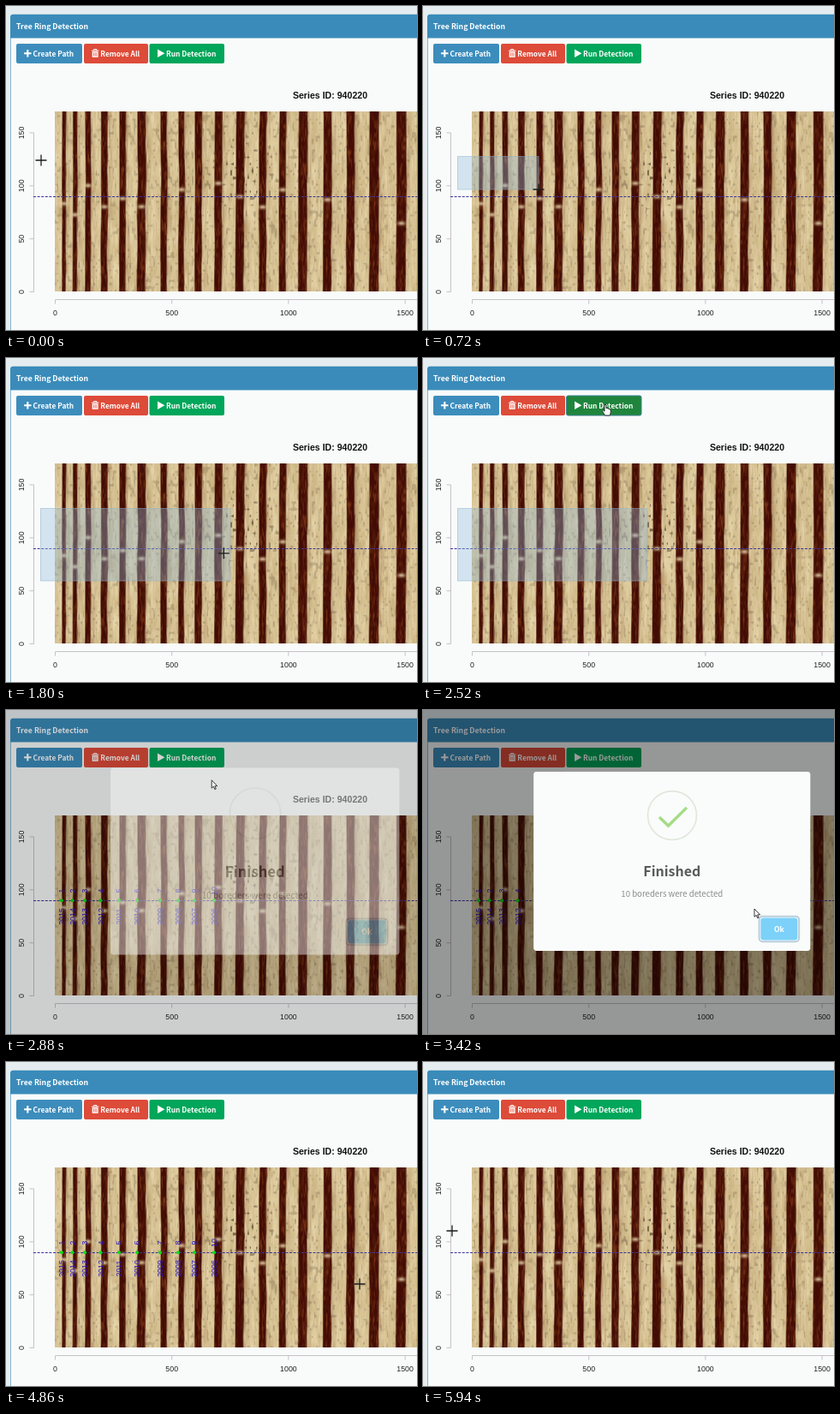
These frames come from a looping animation (480 px wide and 378 px high, 6.12 s). An HTML page with a canvas:

```html
<!DOCTYPE html>
<html lang="en">
<head>
<meta charset="utf-8">
<title>Tree Ring Detection</title>
<style>
  html, body { margin: 0; width: 100%; height: 100%; overflow: hidden; background: #f9fbfb; }
  #wood { position: absolute; left: 57px; top: 123px; }
  svg { position: absolute; left: 0; top: 0; }
  .ui { font-family: "Noto Sans CJK JP", "Noto Sans CJK SC", "Open Sans", sans-serif; }
  .bold { font-weight: 700; }
  .btn { font-size: 8.4px; fill: #fff; }
  .plot { font-family: "Liberation Sans", Arial, sans-serif; font-size: 8.8px; fill: #222; }
  .mid { text-anchor: middle; }
  .axis { stroke: #c6c0c6; fill: none; }
  .mark { fill: #2614c4; }
  .hand, .arrow { fill: #fff; stroke: #222; stroke-width: .9; stroke-linejoin: round; }
  #run { fill: #00a65a; }
  #run.hot { fill: #1f853c; stroke: #3d7f92; }
  #remove { fill: #dd4b39; }
  #remove.hot { fill: #c9402f; }
  #ok { fill: #7cd1f9; }
  #ok.hot { fill: #74cbf3; }
</style>
</head>
<body>
<canvas id="wood" width="423" height="210"></canvas>
<svg width="480" height="378" viewBox="0 0 480 378">
  <path d="M0 0H480V10H5V378H0Z" fill="#e6edf1"/>
  <path d="M5.5 378V14" stroke="#84b6d5"/>
  <path d="M5 37.6V12.8q0-3 3-3H480V37.6Z" fill="#3a8bba"/>
  <text class="ui bold" x="12" y="27.3" font-size="8.75" fill="#fff">Tree Ring Detection</text>

  <rect x="12" y="44" width="77" height="23" rx="2" fill="#3c8dbc"/>
  <path d="M25.3 51v8.4M21.1 55.2h8.4" stroke="#fff" stroke-width="2.1"/>
  <text class="ui bold btn" x="31.5" y="58.6">Create Path</text>

  <rect id="remove" x="91" y="44" width="75" height="23" rx="2"/>
  <path d="M100 52.1h8.4M102.6 52v-1.4h3.2V52" stroke="#fff" fill="none"/>
  <path d="M100.7 53.2h7v6.6h-7z" fill="#fff"/>
  <path d="M102.5 54.4v4.2M104.2 54.4v4.2M105.9 54.4v4.2" stroke="#dd4b39" stroke-width=".7"/>
  <text class="ui bold btn" x="110.3" y="58.6">Remove All</text>

  <rect id="run" x="167.5" y="44" width="87.5" height="23" rx="2"/>
  <path d="M177 50.6l8.4 4.7-8.4 4.7z" fill="#fff"/>
  <text class="ui bold btn" x="187" y="58.6">Run Detection</text>

  <text class="plot mid" x="378.5" y="108.3" style="font-size:10.6px;font-weight:700;fill:#111">Series ID: 940220</text>
  <g id="axes"></g>
  <path d="M32 222.5H480" stroke="#3a3398" stroke-dasharray="3 1.6"/>
  <g id="marks"></g>
  <rect id="brush" x="40.5" y="175.5" fill="#8fb8d8" fill-opacity=".37" stroke="#8fb0c8" stroke-opacity=".5"/>

  <rect id="shade" width="480" height="378"/>
  <g id="modal">
    <rect x="129" y="72" width="323.5" height="209" rx="3.4" fill="#fafcfb"/>
    <circle cx="291" cy="123" r="28.5" fill="none" stroke="#c9d8c4" stroke-opacity=".55" stroke-width="1.6"/>
    <path id="check" d="M276 125l10.5 10L309 112.8" pathLength="1" fill="none" stroke="#a5dc86" stroke-width="3.4"/>
    <text class="ui bold mid" x="290.8" y="194" font-size="16" fill="#595b5b">Finished</text>
    <text class="ui mid" x="290.8" y="218.3" font-size="9.65" fill="#8a8c8c">10 boreders were detected</text>
    <rect x="392.7" y="240.7" width="46.6" height="29.6" rx="4" fill="none" stroke="#bccfdc" stroke-width="2"/>
    <rect id="ok" x="394.5" y="242.5" width="43" height="26" rx="3"/>
    <text class="ui bold mid" x="416" y="258.8" font-size="8.7" fill="#fff">Ok</text>
  </g>

  <g id="cursor">
    <path id="cross" d="M-6.5 0H6.5M0-6.5V6.5" stroke="#1c1c1c" stroke-width="1.3"/>
    <path id="arrow" class="arrow" d="M0 0V9.3L2.2 7.4 3.7 10.8 5.1 10.2 3.7 6.9H6.6Z"/>
    <path id="hand" class="hand" d="M-1 .9Q0-.6 1 .9V4.7Q2.4 4 3 5.2 4.3 4.6 4.8 5.8 6.2 5.6 6.2 7V9.3Q6 11 5.2 13H-.6Q-1.6 10.6-3.2 8.8-4 7.4-2.6 7L-1 8.2Z"/>
  </g>
</svg>
<script>
const LOOP = 6120, STEP = 180;
const OPEN = 2760, CLOSE = 4590, CLEAR = 5490, FADE = 270;
const $ = id => document.getElementById(id);
const clamp = v => Math.max(0, Math.min(1, v));
const mix = (a, b, k) => a + (b - a) * k;
const smooth = k => k * k * (3 - 2 * k);
const blend = (a, b, k) => a.map((v, i) => mix(v, b[i], k));

// Left edge of each ring; the dark part takes a fixed share of the gap to the next
const rings = [65, 77.5, 92, 110.5, 132, 153, 180, 201, 220, 243, 268, 295, 318.5, 341, 370, 397, 424, 455.5];
const bands = rings.map((x, i) => ({ x, w: .36 * ((rings[i + 1] || x + 32) - x) }));
const knots = bands.map(({ x, w }, i) => [x + w / 2, 205 + 50 * hash(i, 9)])
  .filter((_, i) => hash(i, 4) < .6);

function hash(x, y) {
  let h = Math.imul(x, 374761393) + Math.imul(y, 668265263);
  h = Math.imul(h ^ (h >>> 13), 1274126177);
  return ((h ^ (h >>> 16)) >>> 0) / 4294967296;
}
function noise(x, y) {
  const i = Math.floor(x), j = Math.floor(y), u = smooth(x - i), v = smooth(y - j);
  return mix(mix(hash(i, j), hash(i + 1, j), u), mix(hash(i, j + 1), hash(i + 1, j + 1), u), v);
}
const blob = (dx, dy, w, h) => Math.exp(-((dx / w) ** 2) - (dy / h) ** 2);

// Sharp left edge, softer right edge, faint tail
function darkness(x, grain) {
  return Math.max(...bands.map(({ x: l, w }) => {
    const d = x - l;
    const core = smooth(clamp((w + .8 + grain - d) / 2.6));
    const tail = .25 * grain * clamp(1 - (d - w) / 7);
    return clamp((d + .7) / 1.5) * Math.max(core, tail);
  }));
}
function paintWood() {
  const ctx = $("wood").getContext("2d"), img = ctx.createImageData(423, 210);
  for (let j = 0, p = 0; j < 210; j++) {
    for (let i = 0; i < 423; i++, p += 4) {
      const x = i + 57, y = j + 123;
      const streak = noise(x / 1.7, y / 16), fine = noise(x / 1.2 + 90, y / 5), cloud = noise(x / 9, y / 22 + 50);
      const fleck = clamp((noise(x / 2.5, y / 4 + 30) - .68) * 5) * (.25 + .6 * blob(x - 275, y - 195, 35, 40));
      const sway = (noise(y / 40, x / 30) - .5) * 1.2 - (y - 228) / 230;
      const knot = Math.max(...knots.map(([kx, ky]) => blob(x - kx, y - ky, 4.5, 2.5)));
      let c = blend([235, 219, 177], [196, 171, 120], .35 * streak + .3 * fine + .35 * cloud);
      c = blend(c, [100, 82, 56], fleck);
      c = blend(c, blend([66, 12, 4], [118, 50, 20], clamp(fine * streak * 1.5 - .2)), darkness(x - sway, streak));
      c = blend(c, [232, 212, 166], .8 * knot);
      img.data.set([...c, 255], p);
    }
  }
  ctx.putImageData(img, 0, 0);
}

const upright = (x, y, s, cls = "") =>
  `<text class="plot mid ${cls}" transform="translate(${x + 3} ${y}) rotate(-90)">${s}</text>`;

function buildPlot() {
  let axes = '<path class="axis" d="M32.5 148V333.5M57.5 342.5H480"/>';
  for (let i = 0; i < 4; i++) {
    const x = 57.5 + 136.2 * i, y = 333.5 - 61.85 * i;
    axes += `<path class="axis" d="M${x} 342.5v5M32.5 ${y}h-5"/>` +
      `<text class="plot mid" x="${x}" y="360.5">${500 * i}</text>` + upright(18, y, 50 * i);
  }
  $("axes").innerHTML = axes;
  $("marks").innerHTML = rings.slice(0, 10).map((x, i) =>
    upright(x, 241, 2015 - i, "mark") + upright(x, 211, i + 1, "mark") +
    `<circle cx="${x}" cy="222.3" r="2" fill="#0be010"/>`).join("");
}

// Pointer: rests at home, then moves of [leave, arrive, x, y]
const home = [41, 180], corner = [262, 260];
const moves = [
  [180, 1380, ...corner],
  [1620, 2340, 213, 54],
  [2700, 3420, 387, 232],
  [3420, 4140, 413, 259],
  [4860, 5400, 128, 55],
  [5580, 5940, 34, 197]
];
const pointer = t => moves.reduce((p, [from, to, ...end]) =>
  blend(p, end, smooth(clamp((t - from) / (to - from)))), home);

const show = (id, on) => $(id).style.display = on ? "" : "none";
const set = (id, attrs) => Object.entries(attrs).forEach(([k, v]) => $(id).setAttribute(k, v));

function draw(t) {
  const [x, y] = pointer(t);
  const alpha = clamp((t - OPEN) / FADE) * (1 - clamp((t - CLOSE) / FADE));
  const open = alpha > 0;

  const hover = (id, active) => {
    const b = $(id).getBBox();
    const hot = active && x >= b.x && x <= b.x + b.width && y >= b.y && y <= b.y + b.height;
    $(id).classList.toggle("hot", hot);
    return hot;
  };
  show("shade", open);
  show("modal", open);
  const hand = [hover("run", !open), hover("remove", !open), open && hover("ok", true)].includes(true);
  const cross = !hand && !open && y > 76;
  show("hand", hand);
  show("cross", cross);
  show("arrow", !hand && !cross);
  set("cursor", { transform: `translate(${x} ${y})` });

  const [bx, by] = t < 1440 ? [x, y] : corner;
  show("brush", t > 180 && t < OPEN);
  set("brush", { width: Math.max(0, bx - 40.5), height: Math.max(0, by - 175.5) });
  show("marks", t >= OPEN && t < CLEAR);

  const age = clamp((t - OPEN) / 300);
  const scale = 1 - .5 * Math.exp(-6 * age) * Math.cos(7 * age);
  set("shade", { opacity: .4 * alpha });
  set("modal", { opacity: alpha, transform: `translate(290.8 176.5) scale(${scale}) translate(-290.8 -176.5)` });
  const drawn = clamp((t - OPEN - 350) / 320);
  set("check", { "stroke-dasharray": `${drawn} 2` });
  show("check", drawn > 0);
}

paintWood();
buildPlot();
const start = performance.now();
function tick() {
  const t = (performance.now() - start) % LOOP;
  draw(Math.floor(t / STEP) * STEP);
  requestAnimationFrame(tick);
}
tick();
</script>
</body>
</html>
```
